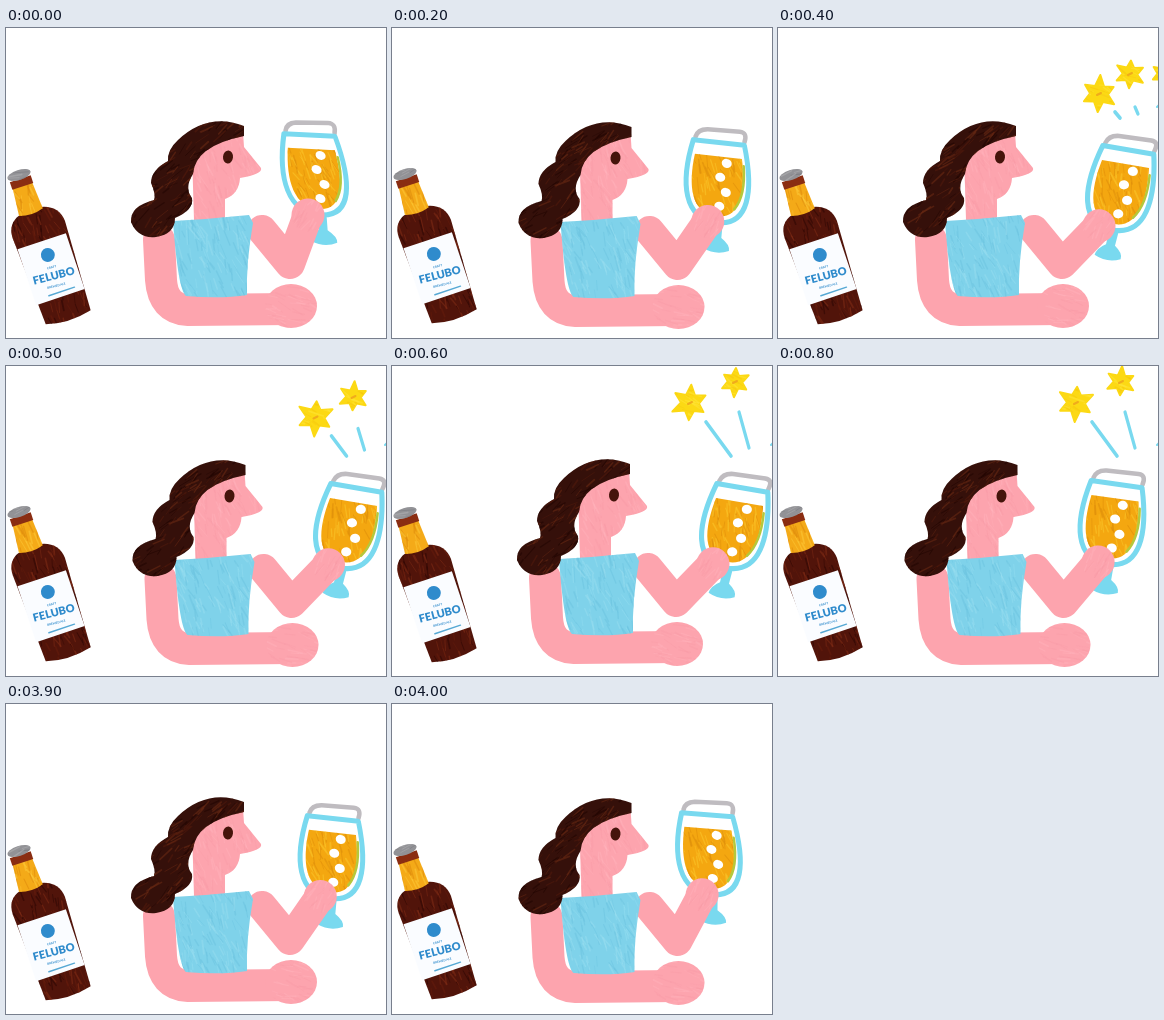
Write an HTML page with a canvas that moves like this. It is 380 by 310 pixels and loops after 4.1 s.

```html
<!DOCTYPE html>
<html lang="en">
<head>
<meta charset="utf-8">
<title>Cheers</title>
<style>
  html, body { margin: 0; width: 100%; height: 100%; overflow: hidden; background: #fff; }
  canvas { display: block; }
</style>
</head>
<body>
<canvas id="stage" width="380" height="310"></canvas>
<script>
const ctx = document.getElementById('stage').getContext('2d');
const LOOP = 4100, BEAT = 100, HOLD_START = 800, HOLD_END = 3800;
const CYAN = '#79d9ef', BLUE = '#2f8bcc';

// Each paint: base colour, then the tones of its brush streaks
const paints = {
  skin: ['#fda4ae', '#ffb4bc', '#f599a4'],
  shirt: ['#7fd2ea', '#97def0', '#6cc4e0'],
  hair: ['#35100a', '#682813', '#220603', '#501a0c'],
  glassBottle: ['#51140a', '#7d2a14', '#300804', '#651c0c'],
  amber: ['#f4aa18', '#fcc636', '#e08c0c'],
  beer: ['#f4a710', '#fbc52a', '#e08f0a'],
  star: ['#fcd914', '#ffe63c', '#f6c60c'],
  steel: ['#929296', '#b5b5b8', '#77777c']
};

let seed = 1;
function random() {
  seed = (seed * 16807) % 2147483647;
  return seed / 2147483647;
}
const between = (a, b) => a + (b - a) * random();
const mix = (a, b, t) => a + (b - a) * t;

function fill(path, color) {
  ctx.fillStyle = color;
  ctx.fill(path);
}

function stroke(path, color, width) {
  ctx.strokeStyle = color;
  ctx.lineWidth = width;
  ctx.lineCap = ctx.lineJoin = 'round';
  ctx.stroke(path);
}

const line = (x1, y1, x2, y2, color, width) =>
  stroke(new Path2D(`M${x1} ${y1}L${x2} ${y2}`), color, width);

function oval(x, y, rx, ry = rx, turn = 0) {
  const path = new Path2D();
  path.ellipse(x, y, rx, ry, turn, 0, 7);
  return path;
}

// Flat colour with streaks scattered over the box x, y, w, h
function paint(path, [base, ...tones], [x, y, w, h], angle, alpha = .5) {
  fill(path, base);
  ctx.save();
  ctx.clip(path);
  ctx.globalAlpha = alpha;
  for (let i = 0; i < w * h / 50; i++) {
    const px = x + w * random(), py = y + h * random();
    const turn = angle + between(-.35, .35), size = between(3, 8);
    const dx = Math.cos(turn) * size, dy = Math.sin(turn) * size;
    line(px - dx, py - dy, px + dx, py + dy, tones[i % tones.length], between(.6, 1.8));
  }
  ctx.restore();
}

const limb = (path, width) => stroke(path, paints.skin[0], width);

const bottleBody = new Path2D('M-11 38Q-26 42 -26 58L-22 150Q0 157 25 151L29 58Q28 41 10 37Z');
const neck = new Path2D('M-10 8L10 8L12 39Q0 43 -13 39Z');
const collar = new Path2D('M-11 4H11V12H-11Z');
const lowerArm = new Path2D('M153 212L155 252Q157 281 182 282L285 281');
const head = new Path2D('M186 125L212 106L237 104L238 119L255 140Q257 146 234 150Q233 166 219 171V192H188Z');
const shirt = new Path2D('M167 193Q205 191 243 187L247 195Q240 235 241 267Q215 271 180 268Q172 262 167 193Z');
const hair = new Path2D('M238 98Q202 84 172 112Q161 122 162 133Q145 142 145 155Q150 166 148 172Q124 178 125 194Q132 211 150 209Q169 206 169 190Q188 182 186 170Q178 160 187 146Q189 118 238 108Z');
const bowl = new Path2D('M-26 -105H25C36 -60 32 -25 0 -25C-33 -25 -38 -60 -26 -105Z');
const beer = new Path2D('M-24 -91H23C28 -56 22 -31 0 -31C-26 -31 -30 -58 -24 -91Z');
const rim = new Path2D('M-24 -108Q-22 -116 -12 -117L20 -118Q28 -118 25 -108');
const foot = new Path2D('M-3 -27H6L5 -10Q14 -4 13 2Q0 8 -13 2Q-12 -5 -4 -10Z');

function drawBottle() {
  ctx.save();
  ctx.translate(13, 147);
  ctx.rotate(-.323);
  paint(bottleBody, paints.glassBottle, [-27, 37, 56, 118], 1.5, .6);
  paint(neck, paints.amber, [-13, 8, 26, 34], 1.5, .6);
  fill(collar, '#8a2d12');
  paint(oval(0, 0, 12, 5), paints.steel, [-12, -5, 24, 10], 0);
  ctx.fillStyle = '#fafcff';
  ctx.fillRect(-25, 70, 51, 59);
  fill(oval(2, 85, 7), BLUE);
  line(-10, 124, 17, 124, '#55a8d4', 1.4);
  ctx.translate(1, 107);
  ctx.rotate(.07);
  ctx.fillStyle = BLUE;
  ctx.textAlign = 'center';
  ctx.textBaseline = 'middle';
  ctx.font = '900 11px Lato, sans-serif';
  ctx.fillText('FELUBO', 0, 0);
  ctx.font = '700 3px Lato, sans-serif';
  ctx.fillText('CRAFT', 0, -9);
  ctx.fillText('BREWED ALE', 0, 10);
  ctx.restore();
}

// The rim travels further than the foot, so the glass tips as it rises
function drawGlass(raise) {
  ctx.save();
  ctx.transform(1, .05 + .03 * raise, .134 - .083 * raise, 1, 318 + 3 * raise, 212 + 3.75 * raise);
  stroke(rim, '#bfbcc0', 4.5);
  fill(foot, CYAN);
  fill(bowl, '#fff');
  stroke(bowl, CYAN, 5);
  paint(beer, paints.beer, [-29, -92, 56, 62], 1.2, .6);
  stroke(new Path2D('M25 -84Q28 -55 17 -40'), '#b5c83c', 2.5);
  for (let i = 0; i < 4; i++)
    fill(oval(5 + (i % 2 ? -3 : 3), -85 + 14.5 * i, 5, 4.5), '#fff');
  ctx.restore();
}

function drawRaisedArm(raise) {
  const x = 302 + 19 * (1 - (1 - raise / 4) ** 1.5), y = 187 + 2.7 * raise;
  limb(new Path2D(`M256 202L284 236L${x} ${y}`), 30);
  paint(oval(x, y, 16.5), paints.skin, [x - 16, y - 16, 33, 33], -1, .35);
}

function drawWoman() {
  limb(lowerArm, 32);
  paint(oval(285, 278, 26, 22), paints.skin, [259, 256, 52, 44], .3, .35);
  paint(head, paints.skin, [188, 104, 68, 88], 1.2, .35);
  paint(shirt, paints.shirt, [166, 187, 81, 83], 1.2);
  paint(hair, paints.hair, [125, 92, 113, 118], -.7, .6);
  fill(oval(222, 129, 5, 6.5, .1), '#45140b');
}

function drawStar(x, y, radius) {
  const path = new Path2D();
  for (let i = 0; i < 12; i++) {
    const r = radius * (i % 2 ? .5 : between(.9, 1.1)), a = i * Math.PI / 6 - 1.5;
    path.lineTo(x + r * Math.cos(a), y + r * Math.sin(a));
  }
  path.closePath();
  stroke(path, paints.star[0], 2);
  paint(path, paints.star, [x - radius, y - radius, 2 * radius, 2 * radius], .4);
  line(x - 2, y + 1, x + 2, y - 1, '#f0ab1c', 2);
}

function drawBurst(t) {
  drawStar(mix(321, 298, t), mix(66, 37, t), 18);
  drawStar(mix(352, 343, t), mix(46, 16, t), 14.5);
  if (t < 1) drawStar(mix(386, 400, t), mix(46, 20, t), 13);
  line(mix(337, 314, t), mix(84, 56, t), mix(342, 339, t), 90, CYAN, 3.6);
  line(mix(357, 347, t), mix(79, 46, t), mix(360, 357, t), mix(86, 82, t), CYAN, 3.2);
  line(379, 79, 381, 77, CYAN, 2);
}

function drawBeat(beat) {
  // Up beat by beat, sink a little after the burst, then back down
  const raise = Math.min(beat, 4, Math.max(3, 7 - beat / 2), 12 - beat);
  const version = beat % 3; // three painted versions take turns
  const nudged = version === 2;
  seed = 1234 + 777 * version;
  ctx.fillStyle = '#fff';
  ctx.fillRect(0, 0, 380, 310);
  ctx.save();
  if (nudged) ctx.translate(0, -1);
  drawBottle();
  ctx.restore();
  drawGlass(raise);
  ctx.save();
  if (nudged) ctx.translate(1.5, 1);
  drawRaisedArm(raise);
  drawWoman();
  ctx.restore();
  if (beat >= 4 && beat <= 8) drawBurst(Math.min(1, (beat - 4) / 2));
}

// Beats last 100 ms each, except the long hold on beat 8
function beatAt(time) {
  if (time < HOLD_START) return Math.floor(time / BEAT);
  return time < HOLD_END ? 8 : 9 + Math.floor((time - HOLD_END) / BEAT);
}

let shown;
function tick() {
  const beat = beatAt(performance.now() % LOOP);
  if (beat !== shown) drawBeat(shown = beat);
  requestAnimationFrame(tick);
}
tick();
</script>
</body>
</html>
```
